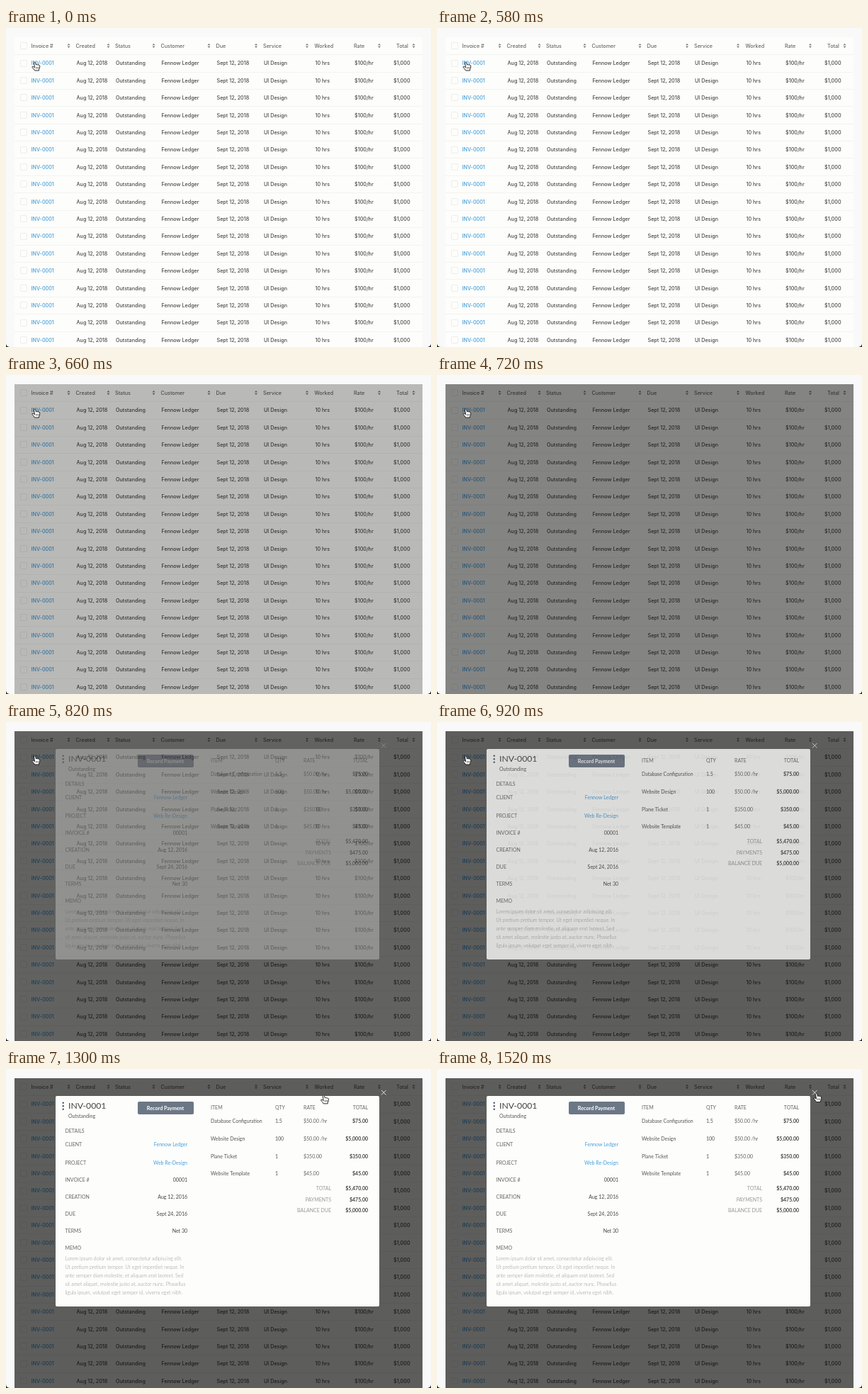
Recreate the animation shown at these times as an HTML page with a canvas. Size 600 by 450 pixels, loop 2.3 s.

```html
<!DOCTYPE html>
<html lang="en">
<head>
<meta charset="utf-8">
<title>Invoice details</title>
<style>
  html, body { margin: 0; height: 100%; overflow: hidden; background: #222; }
  canvas { display: block; }
</style>
</head>
<body>
<canvas id="stage" width="600" height="450"></canvas>
<script>
const stage = document.getElementById('stage').getContext('2d');
const LOOP = 2300;
const CUSTOMER = 'Fennow Ledger';
const LINK = '#459fdb';

// heading, heading x, cell text, cell x, sort arrow x
const columns = [
  ['Invoice #', 35.5, 'INV-0001', 35.5, 88.5],
  ['Created', 98.5, 'Aug 12, 2018', 99.5, 144.5],
  ['Status', 154, 'Outstanding', 155, 208.5],
  ['Customer', 218.5, CUSTOMER, 219.5, 286.5],
  ['Due', 296.5, 'Sept 12, 2018', 297.5, 353],
  ['Service', 363, 'UI Design', 364, 425],
  ['Worked', 435.5, '10 hrs', 436.5],
  ['Rate', 491, '$100/hr', 492, 527],
  ['Total', 551, '$1,000', 547, 575.5],
];
const details = [
  ['DETAILS', '', 87], ['CLIENT', CUSTOMER, 106], ['PROJECT', 'Web Re-Design', 132],
  ['INVOICE #', '00001', 156], ['CREATION', 'Aug 12, 2016', 180],
  ['DUE', 'Sept 24, 2016', 204], ['TERMS', 'Net 30', 228], ['MEMO', '', 252],
];
const items = [
  ['Database Configuration', '1.5', '$50.00 /hr', '$75.00', 73],
  ['Website Design', '100', '$50.00 /hr', '$5,000.00', 98],
  ['Plane Ticket', '1', '$350.00', '$350.00', 123],
  ['Website Template', '1', '$45.00', '$45.00', 147],
];
const sums = [
  ['TOTAL', '$5,470.00', 168], ['PAYMENTS', '$475.00', 184], ['BALANCE DUE', '$5,000.00', 199],
];
const memo = [
  'Lorem ipsum dolor sit amet, consectetur adipiscing elit.',
  'Ut pretium pretium tempor. Ut eget imperdiet neque. In',
  'ante semper diam molestie, et aliquam erat laoreet. Sed',
  'sit amet aliquet, molestie justo at, auctor nunc. Phasellus',
  'ligula ipsum, volutpat eget semper id, viverra eget nibh.',
];
const hand = new Path2D('M-1 1Q0 -1 1.2 .8L2 4Q3 3 4 4Q5 3.4 6 4.4Q7.4 4.2 7.2 6.5' +
  'Q7.2 9 6 10.5V12H0Q-1.5 9.5 -3.5 7.5Q-4 5.8 -1.8 6.5L0 7.8Z');

function bezier(x1, y1, x2, y2) {
  const at = (s, a, b) => 3 * (1 - s) ** 2 * s * a + 3 * (1 - s) * s * s * b + s ** 3;
  return x => {
    let low = 0, high = 1;
    for (let i = 0; i < 24; i++) {
      const mid = (low + high) / 2;
      if (at(mid, x1, x2) < x) low = mid; else high = mid;
    }
    return at(low, y1, y2);
  };
}
const ease = bezier(.25, .1, .25, 1);
const glide = bezier(.17, .1, .15, 1);
const progress = (t, start, length) => Math.min(1, Math.max(0, (t - start) / length));

// y is the middle of the capitals; the baseline sits on a whole pixel
function text(ctx, str, x, y, color, { size = 7, weight = 400, font = 'Lato', align = 'left' } = {}) {
  ctx.font = `${weight} ${size}px ${font}, sans-serif`;
  ctx.textAlign = align;
  ctx.fillStyle = color;
  ctx.fillText(str, x, Math.round(y + size * .36 + .4));
}

function box(ctx, x, y, w, h, radius, color) {
  ctx.fillStyle = color;
  ctx.beginPath();
  ctx.roundRect(x, y, w, h, radius);
  ctx.fill();
}

function checkbox(ctx, y) {
  ctx.strokeStyle = '#ededec';
  ctx.lineWidth = 1;
  ctx.beginPath();
  ctx.roundRect(20.5, y - 4.5, 9, 9, 1.5);
  ctx.stroke();
}

function sortArrows(ctx, x, y) {
  ctx.fillStyle = '#777';
  ctx.beginPath();
  for (const d of [-1, 1]) {
    ctx.moveTo(x - 2, y + d * .8);
    ctx.lineTo(x + 2, y + d * .8);
    ctx.lineTo(x, y + d * 3);
  }
  ctx.fill();
}

function drawTable(ctx) {
  const style = { size: 7.2, weight: 500, font: 'Inter' };
  box(ctx, 0, 0, 600, 450, [0, 0, 5, 5], '#f9f9f9');
  box(ctx, 12, 13, 576, 437, 0, '#fdfdfb');
  checkbox(ctx, 25);
  for (const [title, x, , , arrow] of columns) {
    text(ctx, title, x, 25, '#686868', style);
    if (arrow) sortArrows(ctx, arrow, 25);
  }
  for (let row = 0; row < 17; row++) {
    const y = 49.5 + row * 24.4;
    ctx.fillStyle = '#f3f3f2';
    ctx.fillRect(12, Math.round(y - 12.4), 576, 1);
    checkbox(ctx, Math.round(y));
    columns.forEach(([, , cell, x], i) => text(ctx, cell, x, y, i ? '#484848' : LINK, style));
  }
}

function drawModal(ctx) {
  const right = { align: 'right' }, bold = { align: 'right', weight: 700 };
  box(ctx, 70, 38, 457, 297, 2, '#fdfdfc');

  ctx.strokeStyle = '#ddd';
  ctx.beginPath();
  ctx.moveTo(530, 30); ctx.lineTo(536.5, 36.5);
  ctx.moveTo(536.5, 30); ctx.lineTo(530, 36.5);
  ctx.stroke();

  for (const y of [46.5, 51, 55.5]) box(ctx, 79.5, y, 2.4, 2.4, 1.2, '#4c5664');
  text(ctx, 'INV-0001', 88, 51.5, '#444', { size: 12.2 });
  text(ctx, 'Outstanding', 88, 66, '#555');
  box(ctx, 186, 46, 79, 18, 2, '#6c7786');
  text(ctx, 'Record Payment', 225, 54.8, '#fff', { weight: 700, size: 7.2, align: 'center' });

  for (const [label, value, y] of details) {
    const linked = label === 'CLIENT' || label === 'PROJECT';
    text(ctx, label, 83.5, y, '#666');
    text(ctx, value, 256, y, linked ? LINK : '#444', right);
  }
  memo.forEach((line, i) => text(ctx, line, 83.5, 267 + i * 12, '#8c8c8c', { weight: 300 }));

  text(ctx, 'ITEM', 289, 54.5, '#666');
  text(ctx, 'QTY', 380, 54.5, '#666');
  text(ctx, 'RATE', 420, 54.5, '#666');
  text(ctx, 'TOTAL', 511, 54.5, '#666', right);
  for (const [name, quantity, rate, total, y] of items) {
    text(ctx, name, 289, y, '#555');
    text(ctx, quantity, 380, y, '#555');
    text(ctx, rate, 420, y, '#666');
    text(ctx, total, 511, y + .5, '#444', bold);
  }
  for (const [label, value, y] of sums) {
    text(ctx, label, 459, y, '#999', right);
    text(ctx, value, 511, y, '#444', bold);
  }
}

function drawCursor(ctx, x, y) {
  ctx.save();
  ctx.translate(x, y);
  ctx.fillStyle = '#fff';
  ctx.strokeStyle = '#111';
  ctx.lineWidth = .9;
  ctx.fill(hand);
  ctx.stroke(hand);
  ctx.beginPath();
  for (const fingerX of [2, 3.7, 5.4]) {
    ctx.moveTo(fingerX, 7);
    ctx.lineTo(fingerX, 9.5);
  }
  ctx.lineWidth = .6;
  ctx.stroke();
  ctx.restore();
}

// A layer fades as one sheet, so its text hides what lies behind it.
function layer(paint) {
  const canvas = document.createElement('canvas');
  canvas.width = 600;
  canvas.height = 450;
  paint(canvas.getContext('2d'));
  return canvas;
}
const table = layer(drawTable);
const modal = layer(drawModal);

function draw(now) {
  const t = now % LOOP;
  const shade = ease(progress(t, 583, 300));
  const move = glide(progress(t, 1115, 400));

  stage.clearRect(0, 0, 600, 450);
  stage.drawImage(table, 0, 0);
  box(stage, 12, 13, 576, 437, 0, `rgba(0, 0, 0, ${.63 * shade})`);
  stage.globalAlpha = ease(progress(t, 750, 350));
  stage.drawImage(modal, 0, 0);
  stage.globalAlpha = 1;
  drawCursor(stage, 40.5 + 495 * move, 48 - 13.5 * move);
  requestAnimationFrame(draw);
}
requestAnimationFrame(draw);
</script>
</body>
</html>
```
